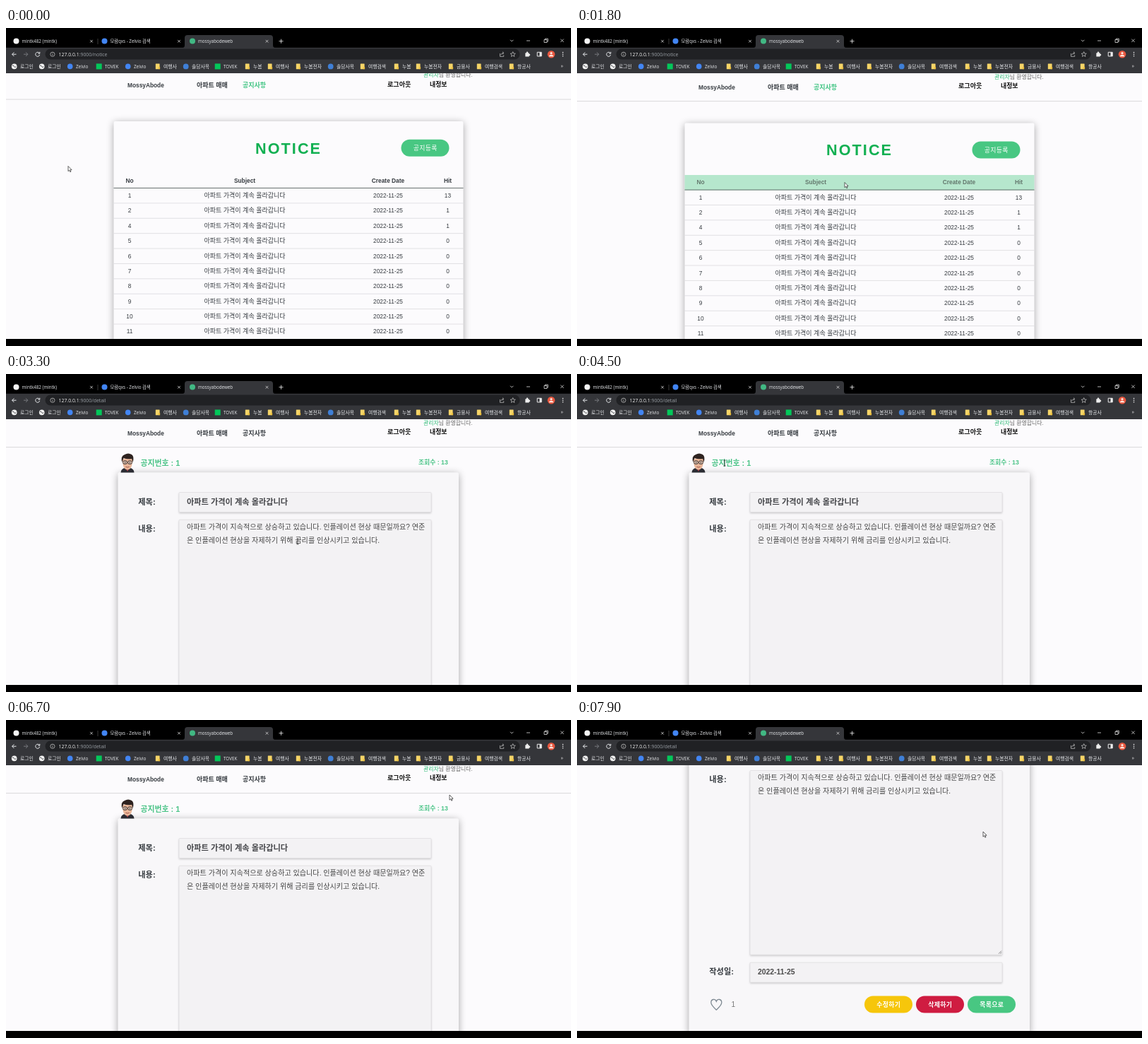
Animation of 800x450 px, one loop 8 s. Source, as an HTML page:

```html
<!DOCTYPE html>
<html lang="ko">
<head>
<meta charset="utf-8">
<style>
html, body { margin: 0; width: 100%; height: 100%; overflow: hidden; background: #000; }
svg { display: block; width: 800px; height: 450px; }
text { white-space: pre; }
.ui { font-family: "Open Sans", "Noto Sans CJK KR", sans-serif; }
.page { font-family: "Liberation Sans", "Noto Sans CJK KR", sans-serif; }
.b { font-weight: 700; }
.mid { text-anchor: middle; }
</style>
</head>
<body>
<svg id="stage" viewBox="0 0 800 450">
  <defs>
    <clipPath id="view"><rect y="64" width="800" height="376"/></clipPath>
    <filter id="soft" x="-10%" y="-10%" width="120%" height="120%"><feGaussianBlur stdDeviation="5.5"/></filter>
    <filter id="lift" x="-5%" y="-30%" width="110%" height="160%"><feGaussianBlur stdDeviation="1.6"/></filter>
  </defs>
</svg>
<script>
const LOOP = 8000, STEP = 100, DETAIL_AT = 2800;
const GREEN = '#48c782', INK = '#363b40', PAPER = '#fcfbfd';
const stage = document.getElementById('stage');

function add(parent, tag, attrs = {}) {
  const el = document.createElementNS('http://www.w3.org/2000/svg', tag);
  for (const key in attrs) el.setAttribute(key, attrs[key]);
  parent.appendChild(el);
  return el;
}
const group = (parent, attrs) => add(parent, 'g', attrs);
const rect = (parent, x, y, width, height, fill, more) => add(parent, 'rect', { x, y, width, height, fill, ...more });
const dot = (parent, cx, cy, r, fill) => add(parent, 'circle', { cx, cy, r, fill });
const line = (parent, d, stroke, width = 1, more) =>
  add(parent, 'path', { d, stroke, 'stroke-width': width, fill: 'none', ...more });
function label(parent, x, y, str, size, fill, cls = '') {
  const el = add(parent, 'text', { x, y, 'font-size': size, fill, class: cls });
  el.textContent = str;
  return el;
}
function pill(parent, x, y, str, fill, cls = '') {
  rect(parent, x, y, 68, 24, fill, { rx: 12 });
  label(parent, x + 34.2, y + 15.2, str, 8.9, '#fff', 'mid ' + cls).setAttribute('letter-spacing', '.3');
}
function card(parent, x, y, w, h, fill) {
  rect(parent, x, y + 2, w, h, '#000', { filter: 'url(#soft)', opacity: .34 });
  rect(parent, x, y, w, h, fill, { rx: 2 });
}
function field(parent, y, h) {
  rect(parent, 245, y + 1.5, 357, h, '#000', { filter: 'url(#lift)', opacity: .2 });
  rect(parent, 245, y, 357, h, '#f3f2f4', { stroke: '#dedde0', 'stroke-width': .7, rx: 1 });
}

// Page
const view = group(stage, { 'clip-path': 'url(#view)', class: 'page' });
rect(view, 0, 64, 800, 376, PAPER);
const sheet = group(view);
const notice = group(sheet), detail = group(sheet), nav = group(sheet);

line(nav, 'M0 103.6H800', '#d9d8db', 1);
label(nav, 172, 86.6, 'MossyAbode', 8.33, INK, 'b');
label(nav, 270, 86.8, '아파트 매매', 9, INK, 'b');
const noticeLink = label(nav, 335, 86.8, '공지사항', 9, INK, 'b');
label(nav, 540, 85.4, '로그아웃', 9.1, '#111', 'b');
label(nav, 600, 85.4, '내정보', 8.9, '#111', 'b');
label(nav, 591, 71.6, '관리자', 7.9, '#2fbb77');
label(nav, 612.8, 71.6, '님 환영합니다.', 7.9, '#666');

// Notice list
card(notice, 152.5, 134.5, 495, 420, PAPER);
label(notice, 353, 180.2, 'NOTICE', 21.6, '#12b052', 'b').setAttribute('letter-spacing', '2.08');
pill(notice, 559.5, 160.4, '공지등록', GREEN);
const COLUMNS = [175, 338, 541, 625.5], ROW = 21.39, HEAD_TOP = 208;
const rows = [['No', 'Subject', 'Create Date', 'Hit']];
[1, 2, 4, 5, 6, 7, 8, 9, 10, 11].forEach(no =>
  rows.push([no, '아파트 가격이 계속 올라갑니다', '2022-11-25', no === 1 ? 13 : no < 5 ? 1 : 0]));
const rowViews = rows.map((cells, i) => {
  const g = group(notice), top = HEAD_TOP + i * ROW;
  const back = rect(g, 152.5, top, 495, ROW, '#b6e7cd');
  line(g, `M152.5 ${top + ROW - .3}H647.5`, i ? '#dbdadd' : '#57625f', i ? .8 : .9);
  const texts = cells.map((cell, c) =>
    label(g, COLUMNS[c], top + (i ? 13.2 : 13.4), cell, i && c === 1 ? 9 : 8.33, INK, i ? 'mid' : 'mid b'));
  return { top, back, texts };
});

// Notice detail
card(detail, 158.5, 139.3, 482.5, 440, '#f8f7f9');
const face = group(detail, { transform: 'translate(172 126)' });
add(face, 'path', { d: 'M-9.5 13.5Q-9 7.5-3 7H3Q9 7.5 9.5 13.5Z', fill: '#2b2c33' });
add(face, 'path', { d: 'M-3 6H3L0 12Z', fill: '#b8404a' });
add(face, 'path', { d: 'M-7-5Q-7 9 0 9.5Q7 9 7-5Q0-10-7-5Z', fill: '#e9b699' });
add(face, 'path', { d: 'M-7.8-1Q-10-10-4-12Q1-15 6-12Q10-9 7.6-1L6-6Q0-5-5.5-7Z', fill: '#2e2320' });
for (const x of [-6.2, .8]) rect(face, x, -3, 5.4, 4.2, '#f3d2bf', { rx: 1.5, stroke: '#222', 'stroke-width': 1 });
dot(face, -3.4, -.8, .8, '#222');
dot(face, 3.4, -.8, .8, '#222');
line(face, 'M-2.5 5.2Q0 7 2.5 5.2', '#9b4a40', .9);
label(detail, 190.5, 129.9, '공지번호 : 1', 10.9, '#4cc488', 'b');
label(detail, 584, 127.8, '조회수 : 13', 8.8, '#4cc488', 'b');
[['제목:', 185], ['내용:', 223.2], ['작성일:', 495]].forEach(([str, y]) => label(detail, 187.3, y, str, 11.2, INK, 'b'));
field(detail, 167.5, 28);
label(detail, 256, 185.2, '아파트 가격이 계속 올라갑니다', 11.2, '#45464a', 'b');
field(detail, 206.3, 260.7);
label(detail, 256, 220.1, '아파트 가격이 지속적으로 상승하고 있습니다. 인플레이션 현상 때문일까요? 연준', 10.1, '#454545');
label(detail, 256, 239.1, '은 인플레이션 현상을 자제하기 위해 금리를 인상시키고 있습니다.', 10.1, '#454545');
line(detail, 'M597 465.5l4-4M599.4 465.5l1.8-1.8', '#555', .7);
field(detail, 478, 28);
label(detail, 256, 495.3, '2022-11-25', 10.4, '#4a4a4a', 'b');
line(detail, 'M197.3 545C193 541 189.8 538.3 189.8 534.6C189.8 529.5 195.6 528.8 197.3 533C199 528.8 204.8 529.5 204.8 534.6C204.8 538.3 201.6 541 197.3 545Z', '#7f8a93', 1.3);
label(detail, 218.5, 540.6, '1', 10, '#777');
pill(detail, 407, 525.2, '수정하기', '#f6c60b', 'b');
pill(detail, 480, 525.2, '삭제하기', '#cf1c41', 'b');
pill(detail, 553, 525.2, '목록으로', GREEN, 'b');

// Browser chrome
const chrome = group(stage, { class: 'ui' });
rect(chrome, 0, 0, 800, 28, '#000');
rect(chrome, 0, 27.8, 800, 36.2, '#35363a');
add(chrome, 'path', { d: 'M250 28Q253 28 253 24V14Q253 10 257 10H374Q378 10 378 14V24Q378 28 381 28Z', fill: '#35363a' });
const cross = (x, y, r = 1.8) => line(chrome, `M${x - r} ${y - r}l${2 * r} ${2 * r}m0 ${-2 * r}l${-2 * r} ${2 * r}`, '#ddd', .8);
[['mintk482 (mintk)', 14.5, '#f4f4f4'], ['모람qxs - Zelvio 검색', 139.5, '#4285f4'], ['mossyabodeweb', 264, '#41b883']]
  .forEach(([str, x, color], i) => {
    dot(chrome, x, 18.6, 4, color);
    label(chrome, x + 8, 20.8, str, 6.25, '#e8eaed');
    cross([121, 245, 369.5][i], 18.7);
  });
line(chrome, 'M130 15v8', '#555', .7);
line(chrome, 'M386.5 18.7h6m-3-3v6', '#ddd', .9);
line(chrome, 'M714 16.8l2.2 2.2 2.2-2.2M737 18h5M762 16.5h4v4h-4zM763.3 16.5v-1.4h4v4h-1.3', '#ddd', .8);
cross(787.5, 17.8, 2.2);

rect(chrome, 55.5, 29.5, 672, 15, '#202124', { rx: 7.5 });
line(chrome, 'M14.5 37.2H8.7m2.7-2.8l-2.8 2.8 2.8 2.8', '#e8eaed', 1);
line(chrome, 'M25 37.2h5.8m-2.7-2.8l2.8 2.8-2.8 2.8', '#77797d', 1);
line(chrome, 'M47.2 35.5a3 3 0 1 0 .5 2.4M47.8 33.8v2.4h-2.4', '#e8eaed', 1);
line(chrome, 'M69 37.2a3.1 3.1 0 1 1-6.2 0a3.1 3.1 0 1 1 6.2 0M65.9 36.7v2.2m0-3.8v.7', '#bbb', .8);
const url = label(chrome, 74.5, 39.6, '127.0.0.1', 6.9, '#f1f1f1');
const path = add(url, 'tspan', { fill: '#9aa0a6' });
line(chrome, 'M699.5 36v4.3h5.2v-2M700.8 38Q701.5 35.4 704.5 35.4m-1.5-1.8l1.9 1.8-1.9 1.8', '#bbb', .8);
line(chrome, 'M717.7 33.6l1 2.4 2.6.2-2 1.7.6 2.5-2.2-1.4-2.2 1.4.6-2.5-2-1.7 2.6-.2z', '#ccc', .7);
rect(chrome, 735.3, 35.2, 5.4, 5.4, '#eee', { rx: .6 });
dot(chrome, 738, 34.7, 1.2, '#eee');
dot(chrome, 741, 38, 1.2, '#eee');
line(chrome, 'M752.2 34.3h6v5.6h-6z', '#eee', 1);
rect(chrome, 755.5, 34.3, 2.7, 5.6, '#eee');
dot(chrome, 772, 37.2, 5.3, '#e8573f');
dot(chrome, 772, 35.6, 1.6, '#fde7df');
add(chrome, 'path', { d: 'M768.8 40.3Q769 37.8 772 37.8T775.2 40.3Z', fill: '#fde7df' });
for (const y of [34.6, 37.2, 39.8]) dot(chrome, 788.5, y, .8, '#eee');

const BOOKMARK_ICONS = {
  web(x) {
    dot(chrome, x, 54.4, 3.8, '#f1f1f1');
    line(chrome, `M${x - 2.6} 53q2 0 2.6 1.6t2.4.2`, '#35363a', 1);
  },
  search: x => dot(chrome, x, 54.4, 3.8, '#4285f4'),
  portal: x => rect(chrome, x - 4, 50.4, 8, 8, '#03c75a'),
  office: x => dot(chrome, x, 54.4, 3.9, '#3f7fd6'),
  folder(x) {
    rect(chrome, x - 2.9, 50.6, 5.8, 7.6, '#f6d568', { rx: .5 });
    rect(chrome, x + 1.2, 55, 2.2, 3.2, '#e9bd3b');
  }
};
[
  [20, '로그인', 'web'], [59, '로그인', 'web'], [99, 'Zelvio', 'search'], [140, 'TOVEK', 'portal'],
  [181, 'Zelvio', 'search'], [223, '여행사'], [263, '솔담사옥', 'office'], [308, 'TOVEK', 'portal'],
  [350, '누봄'], [382, '여행사'], [422, '누봄전자'], [468, '솔담사옥', 'office'], [513, '여행검색'],
  [561, '누봄'], [592, '누봄전자'], [638, '금융사'], [678, '여행검색'], [724, '항공사']
].forEach(([x, str, icon = 'folder']) => {
  BOOKMARK_ICONS[icon](x - 8.3);
  label(chrome, x, 56.6, str, /[A-Z]/.test(str) ? 6.3 : 6.8, '#e8eaed');
});
label(chrome, 785.5, 56.2, '»', 7, '#ddd');
rect(stage, 0, 440, 800, 10, '#000');

// Pointer
const arrow = add(stage, 'path', {
  d: 'M0 0V7.2L1.7 5.7 2.8 8.2 4 7.7 2.9 5.2H5.1Z', fill: '#fff', stroke: '#222', 'stroke-width': .7
});
const beam = line(stage, 'M-1.5-4H1.5M0-4V4M-1.5 4H1.5', '#222', .8);

// Motion
const POINTER = [
  [0, 88, 195.5], [500, 88, 195.5], [1500, 379, 218.5], [1900, 379, 218.5], [2300, 413, 236],
  [3600, 413, 237], [4400, 209, 126], [4600, 209, 126], [4900, 620, 124], [5200, 300, 183],
  [5500, 218, 173.5], [5900, 218, 173.5], [6600, 628, 106], [7000, 628, 106], [7600, 575, 158]
];
const SCROLL = [
  [0, 2.6], [200, 0], [3700, 0], [3900, 135], [4100, 135], [4400, 0], [5500, 0], [5700, 52],
  [5900, 52], [6200, 135], [6400, 135], [6600, 0], [7300, 0], [7700, 134.8]
];
function sample(keys, t) {
  const next = keys.findIndex(key => key[0] > t);
  if (next < 0) return keys[keys.length - 1].slice(1);
  const a = keys[next - 1], b = keys[next];
  const p = (t - a[0]) / (b[0] - a[0]), ease = p * p * (3 - 2 * p);
  return a.slice(1).map((v, i) => v + (b[i + 1] - v) * ease);
}
const show = (el, on) => el.setAttribute('visibility', on ? 'visible' : 'hidden');

function render(t) {
  const [x, y] = sample(POINTER, t), [scroll] = sample(SCROLL, t);
  const onDetail = t >= DETAIL_AT;
  sheet.setAttribute('transform', `translate(0 ${-scroll})`);
  notice.style.display = onDetail ? 'none' : '';
  detail.style.display = onDetail ? '' : 'none';
  noticeLink.setAttribute('fill', onDetail ? INK : '#3fc482');
  path.textContent = onDetail ? ':9000/detail' : ':9000/notice';
  rowViews.forEach(({ top, back, texts }) => {
    const pageY = y + scroll;
    const hover = x > 152 && x < 648 && pageY >= top && pageY < top + ROW;
    back.setAttribute('opacity', hover ? 1 : 0);
    texts.forEach(el => el.setAttribute('fill', hover ? '#63786d' : INK));
  });
  const typing = (t >= DETAIL_AT && t < 3700) || (t >= 4300 && t < 4700);
  show(arrow, !typing);
  show(beam, typing);
  (typing ? beam : arrow).setAttribute('transform', `translate(${x} ${y})`);
}
function tick() {
  const t = performance.now() % LOOP;
  render(Math.floor(t / STEP) * STEP);
  requestAnimationFrame(tick);
}
tick();
</script>
</body>
</html>
```
